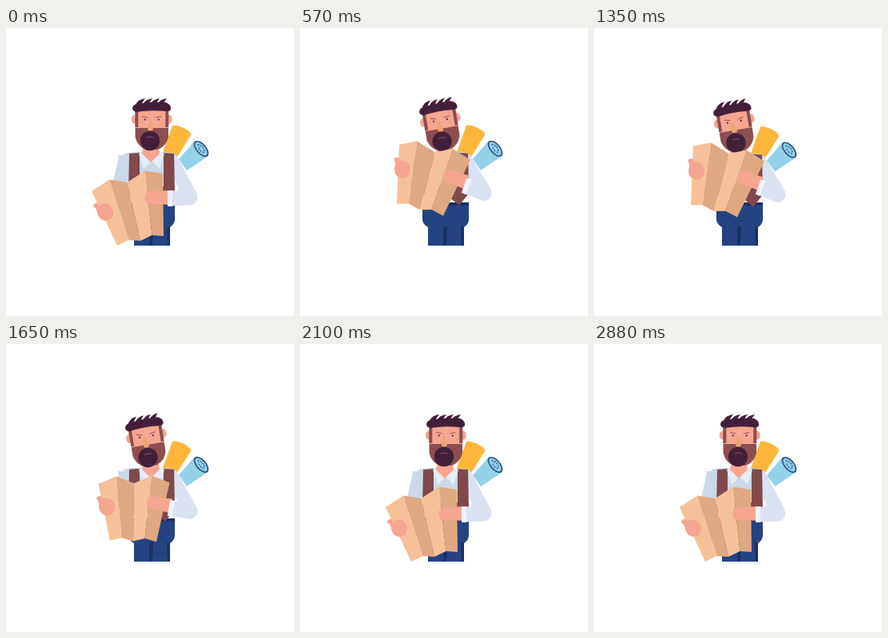
An HTML page with a canvas that plays this animation: 360 by 360 pixels, repeating every 2.91 s.

```html
<!DOCTYPE html>
<html lang="en">
<head>
<meta charset="utf-8">
<style>
html, body { margin: 0; width: 100%; height: 100%; overflow: hidden; background: #fff; }
canvas { display: block; width: 360px; height: 360px; }
</style>
</head>
<body>
<canvas id="stage"></canvas>
<script>
const LOOP = 2910, STEP = 30, FOLDS = 4;
const canvas = document.getElementById('stage');
const ctx = canvas.getContext('2d');
const ratio = window.devicePixelRatio || 1;
canvas.width = canvas.height = 360 * ratio;

const SKIN = '#f6a591', HAIR = '#43203a', BEARD = '#8c4e50', VEST = '#80494c';
const SHIRT = '#cbd9e8', SLEEVE = '#dae2f2', NAVY = '#254382', DARK = '#1b3064';
const SHEET = ['#f6c199', '#e0a880'];

const mix = (a, b, k) => a + (b - a) * k;
const mixPoint = (p, q, k) => [mix(p[0], q[0], k), mix(p[1], q[1], k)];

function ease(t, from, to) {
  const k = Math.min(1, Math.max(0, (t - from) / (to - from)));
  return k * k * (3 - 2 * k);
}

const raised = (t, lag) => ease(t, 0, 300) - ease(t, 1500 + lag, 1800 + lag);

function poly(color, ...points) {
  ctx.beginPath();
  for (const [x, y] of points) ctx.lineTo(x, y);
  ctx.closePath();
  ctx.fillStyle = color;
  ctx.fill();
}

function shape(color, d) {
  ctx.fillStyle = color;
  ctx.fill(new Path2D(d));
}

function oval(color, x, y, rx, ry = rx) {
  ctx.beginPath();
  ctx.ellipse(x, y, rx, ry, 0, 0, 7);
  ctx.fillStyle = color;
  ctx.fill();
}

function line(color, width, d) {
  ctx.strokeStyle = color;
  ctx.lineWidth = width;
  ctx.stroke(new Path2D(d));
}

function placed([x, y], degrees, draw) {
  ctx.save();
  ctx.translate(x, y);
  ctx.rotate(degrees * Math.PI / 180);
  draw();
  ctx.restore();
}

// Draws a half twice, mirrored about the vertical line at x
function mirrored(x, draw) {
  for (const side of [-1, 1]) {
    ctx.save();
    ctx.translate(x, 0);
    ctx.scale(side, 1);
    draw();
    ctx.restore();
  }
}

function trousers() {
  shape(NAVY, 'M153 219H211V240Q210 246 205 249V272H160V249Q154 246 153 240Z');
  shape(DARK, 'M153 218H211V222H153ZM179 248H184L183 272H179ZM201 248H205V272H202Z');
}

function rolls() {
  shape('#fcb73a', 'M208 122Q211 120 222 125Q232 130 231 134L214 161L195 158Z');
  shape('#94d2ea', 'M236 141L253 160L226 178L216 164Z');
  placed([244, 151], 49, () => {
    oval('#2c5080', 0, 0, 12, 6.5);
    oval('#92cfeb', 0, 0, 10.3, 4.8);
    ctx.setLineDash([2, 1.5]);
    line('#2c5080', 1.2, 'M-7 0Q-3 -4 3 -2Q8 0 3 2Q-3 3 -4 0');
    ctx.setLineDash([]);
  });
}

function torso() {
  shape(SHIRT, 'M147 157Q153 155 170 155H195Q210 155 214 160L210 205H153Z');
  mirrored(182, () => {
    shape(VEST, 'M15 156L28 157L29 207L17 222L0 208V198H15Z');
    shape('#e6eef5', 'M9 154L16 157L10 176L0 166Z');
  });
  shape(SKIN, 'M172 146H190L192 157L181 168L170 157Z');
}

function head() {
  mirrored(182.3, () => {
    oval(SKIN, 21.5, 114, 4, 5.5);
    shape(SKIN, 'M0 100H20.5V138Q17 149 6 152H0Z');
    shape(BEARD, 'M17 103H21V124H17ZM0 125H20.7V136Q18 148 7 152H0Z');
    oval(HAIR, 8.5, 114.5, 1.1);
    line('#7a4048', 0.8, 'M5 112L12 110.5');
  });
  shape('#eda572', 'M179 115H182L184 127Q180 130 177 127Z');
  shape(HAIR, 'M158 100Q159 95 165 95Q176 92 200 93Q207 96 206 102Q204 105 199 104Q181 102 163 105Q158 104 158 100Z');
  for (let x = 162; x < 190; x += 9) {
    shape(HAIR, `M${x} 96Q${x + 3} 89 ${x + 12} 88L${x + 7} 95Z`);
  }
  oval(HAIR, 180, 141, 12.2);
  line('#8c5058', 1, 'M176 137Q180 135 185 137');
}

// Top and foot slant between two corners; every other fold springs up.
function map(k) {
  const topLeft = mixPoint([107, 204], [124, 146], k);
  const topRight = mixPoint([196, 182], [213, 165], k);
  const footLeft = mixPoint([139, 272], [121, 220], k);
  const footRight = mixPoint([197, 260], [179, 235], k);
  const fold = (a, b, i, spring) => {
    const [x, y] = mixPoint(a, b, i / FOLDS);
    return [x, y - i % 2 * spring];
  };
  for (let i = 0; i < FOLDS; i++) {
    poly(SHEET[i % 2],
      fold(topLeft, topRight, i, 9), fold(topLeft, topRight, i + 1, 9),
      fold(footLeft, footRight, i + 1, 4), fold(footLeft, footRight, i, 4));
  }
}

function leftHand() {
  oval(SKIN, 0, 0, 10, 11);
  oval(SKIN, -7, -12, 3.5, 3);
  shape(SKIN, 'M-9 -10L0 -10L-4 6H-9Z');
}

function rightHand() {
  shape(SKIN, 'M15 -9L-2 -8Q-12 -9 -15 -4Q-17 3 -13 7Q-8 9 2 8L15 9Z');
}

function draw(t) {
  const lift = raised(t, 0), tilt = raised(t, 180);
  const bob = 1.5 * lift * Math.sin(2 * Math.PI * t / 1080);
  const palm = mixPoint([124, 230], [128, 177], lift);
  const grip = mixPoint([189, 212], [194, 188], lift);
  const cuff = mixPoint([205, 213], [208, 198], lift);
  const elbow = mixPoint([230, 212], [230, 207], lift);
  const [ex, ey] = elbow;

  ctx.setTransform(ratio, 0, 0, ratio, 0, 0);
  ctx.fillStyle = '#fff';
  ctx.fillRect(0, 0, 360, 360);
  ctx.lineJoin = 'round';
  trousers();
  ctx.translate(0, bob);
  rolls();
  line(SHIRT, 17, `M149 159V165L142 195L${mixPoint([142, 195], palm, 0.5)}`);
  torso();
  placed([180 - tilt, 150 + tilt], -9.5 * tilt, () => {
    ctx.translate(-180, -150);
    head();
  });
  poly(SLEEVE, [211, 159], [216, 164], [ex + 9, ey - 4], [ex - 9, ey + 2], [211, 190]);
  map(lift);
  line(SLEEVE, 19, `M${ex - 7} ${ey - 14}L${elbow}L${cuff}`);
  placed(grip, 20 * lift, rightHand);
  placed(cuff, 20 * lift, () => {
    ctx.fillStyle = '#eef2fa';
    ctx.fillRect(-3, -10, 6, 20);
  });
  placed(palm, -24 * (1 - lift), leftHand);
}

function tick() {
  draw(Math.floor(performance.now() % LOOP / STEP) * STEP);
  requestAnimationFrame(tick);
}
tick();
</script>
</body>
</html>
```
